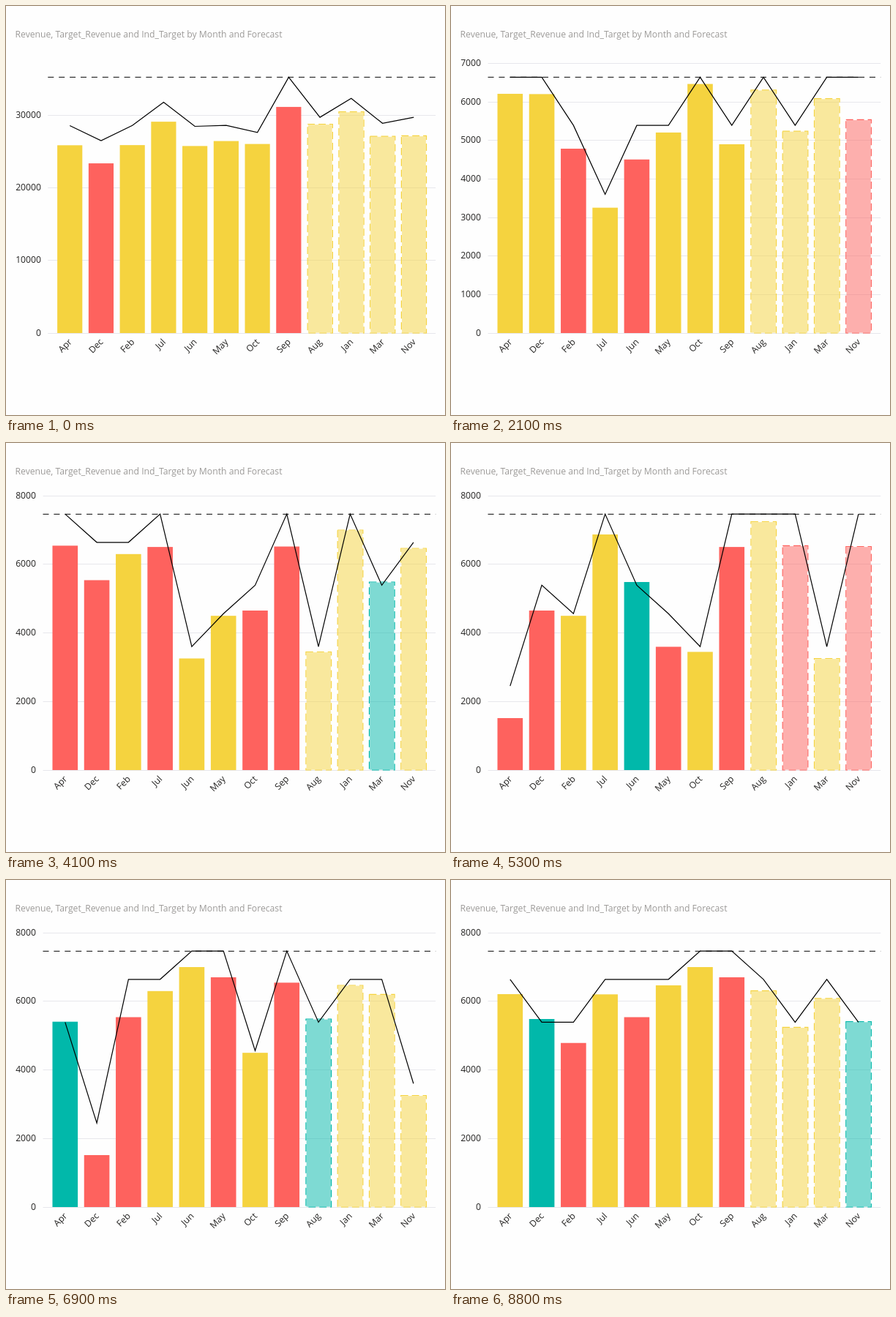
An HTML page that plays this animation: 600x559 px, repeating every 10000 ms.

```html
<!DOCTYPE html>
<html lang="en">
<head>
<meta charset="utf-8">
<style>
  html, body { margin: 0; height: 100%; overflow: hidden; background: #fefefe; }
  svg { display: block; font: 12.2px "Open Sans", "Noto Sans", sans-serif; fill: #252423; }
  .title { fill: #9c9a98; }
  .end { text-anchor: end; }
  .grid { stroke: #e7e7ec; }
  .goal { stroke: #333; stroke-width: 1.2; stroke-dasharray: 8 6.9; }
  .line { stroke: #000; stroke-width: 1.2; fill: none; }
  .edge { fill: none; stroke-width: 1.2; stroke-dasharray: 9.9 5; }
</style>
</head>
<body>
<svg width="600" height="559">
  <text class="title" x="12.5" y="43">Revenue, Target_Revenue and Ind_Target by Month and Forecast</text>
  <g id="plot"></g>
</svg>
<script>
const LOOP = 10000, BASE = 447, RIGHT = 587.2, GOAL_Y = 97.3;

// Bars run alphabetically: actual months first, then the forecast ones.
const CALENDAR = 'Jan Feb Mar Apr May Jun Jul Aug Sep Oct Nov Dec'.split(' ');
const isForecast = month => ['Jan', 'Mar', 'Aug', 'Nov'].includes(month);
const MONTHS = [...CALENDAR].sort((a, b) => isForecast(a) - isForecast(b) || (a < b ? -1 : 1));

// One run of monthly revenues; each series is cut from stretches of it.
const RUN = [
  5240, 4785, 6085, 6209, 5205, 4505, 3254, 6308, 4900, 6465, 5537, 6202, 5405, 6700, 6998,
  6298, 5483, 6543, 4498, 3254, 1515, 3595, 5483, 6870, 7243, 6505, 3446, 6518, 4651
];
const TIERS = [2450, 3600, 4560, 5390, 6640, 7465];
const targetOf = revenue => TIERS[Math.min(Math.round(revenue / 1000) - 2, 5)];

function series(...stretches) {
  const year = stretches.flatMap(([from, to]) => RUN.slice(from, to));
  return MONTHS.map(month => {
    const revenue = year[CALENDAR.indexOf(month)];
    return { month, revenue, target: targetOf(revenue) };
  });
}

const parts = [
  series([0, 12]),
  series([14, 20], [25, 29], [9, 11]),
  series([17, 29]),
  series([9, 21]),
  series([0, 4], [9, 12], [7, 8], [13, 15], [12, 13], [16, 17])
];
const sum = (i, key) => parts.reduce((total, part) => total + part[i][key], 0);
const total = MONTHS.map((month, i) => ({ month, revenue: sum(i, 'revenue'), target: sum(i, 'target') }));

// unit: pixels per 1000; step and max: value axis
const wide = { left: 57.3, unit: 9.917, step: 10000, max: 30000 };
const mid = { left: 50.5, unit: 52.66, step: 1000, max: 7000 };
const tall = { left: 50.5, unit: 46.87, step: 2000, max: 8000 };

const views = [
  { start: 0, axis: wide, data: total },
  { start: 1400, axis: mid, data: parts[0] },
  { start: 3400, axis: tall, data: parts[1] },
  { start: 5300, axis: tall, data: parts[2] },
  { start: 6900, axis: tall, data: parts[3] },
  { start: 8700, axis: tall, data: parts[4] }
];

function colorOf({ revenue, target }) {
  const ratio = revenue / target;
  return ratio < 0.9 ? '#fe625e' : ratio < 1 ? '#f5d33f' : '#01b8aa';
}

const rect = (x, y, w, h, attrs) => `<rect x="${x}" y="${y}" width="${w}" height="${h}" ${attrs}/>`;
const rule = (y, left, kind) => `<path class="${kind}" d="M${left} ${y}H${RIGHT}"/>`;

function render({ axis, data }) {
  const { left, unit, step, max } = axis;
  const pitch = (RIGHT - left) / 12.4, width = pitch * 0.8;
  const yOf = value => BASE - value * unit / 1000;
  const center = i => left + pitch * (i + 0.7);
  let out = '';

  for (let v = 0; v <= max; v += step) {
    const y = Math.floor(yOf(v)) + 0.5;
    out += rule(y, left, 'grid') +
      `<text class="end" x="${Math.floor(left) - 9}" y="${y + 3.8}">${v}</text>`;
  }
  data.forEach((d, i) => {
    const x = center(i) - width / 2, y = yOf(d.revenue), h = BASE - y, color = colorOf(d);
    out += isForecast(d.month)
      ? rect(x + 0.9, y + 0.6, width - 1.4, h - 1, `fill="${color}" fill-opacity=".5"`) +
        rect(x + 0.2, y, width, h, `class="edge" stroke="${color}"`)
      : rect(x, y, width, h, `fill="${color}"`);
    out += `<text class="end" transform="translate(${center(i) + 3.5} 460) rotate(-45)">${d.month}</text>`;
  });
  const points = data.map((d, i) => `${center(i)},${yOf(d.target)}`).join(' ');
  return out + rule(GOAL_Y, left, 'goal') + `<polyline class="line" points="${points}"/>`;
}

const plot = document.getElementById('plot');
let shown;
function tick() {
  const t = performance.now() % LOOP;
  const view = views.findLast(v => v.start <= t);
  if (view !== shown) plot.innerHTML = render(shown = view);
  requestAnimationFrame(tick);
}
tick();
</script>
</body>
</html>
```
